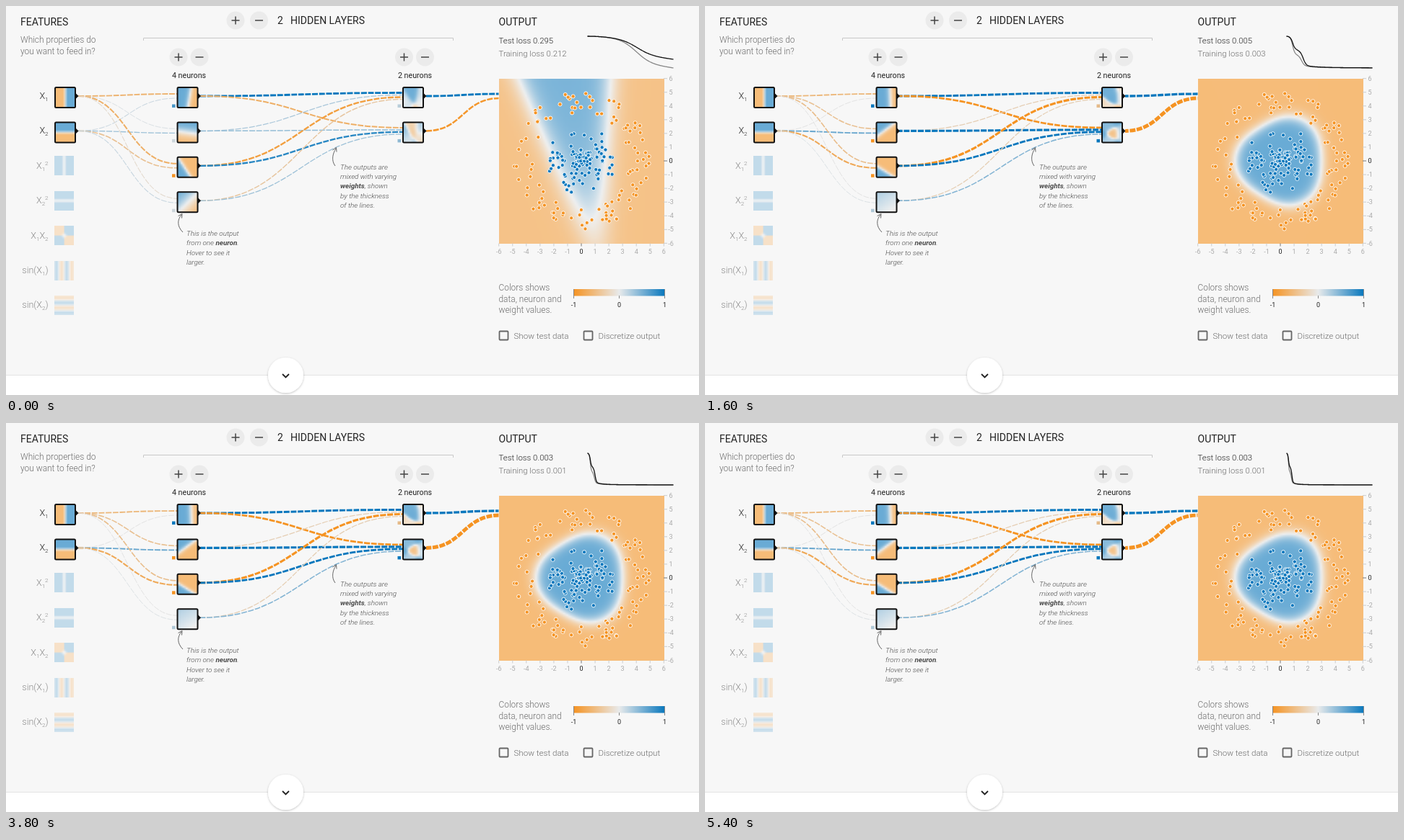
These frames come from a looping animation (960x540 px, 6.11 s). An HTML page with a canvas:

```html
<!DOCTYPE html>
<html lang="en">
<head>
<meta charset="utf-8">
<title>Neural network training</title>
<style>
html, body { margin: 0; width: 100%; height: 100%; overflow: hidden; background: #f7f7f7; }
canvas, svg { position: absolute; left: 0; top: 0; width: 960px; height: 540px; }
text { font-family: Roboto, "Liberation Sans", sans-serif; fill: #6c6c6c; }
.head { font-size: 14px; fill: #222; }
.body { font-size: 11.9px; font-weight: 300; }
.loss { font-size: 11.4px; font-weight: 300; }
.count { font-size: 10.7px; fill: #222; text-anchor: middle; }
.note { font-size: 9.85px; font-weight: 300; font-style: italic; fill: #4c4c4c; }
.note tspan { font-weight: 700; }
.option { font-size: 11.6px; font-weight: 300; }
.axis { font-size: 9px; fill: #aaa; text-anchor: middle; }
.dark { fill: #222; }
.label { font-size: 12.5px; font-weight: 300; fill: #222; text-anchor: end; }
.small { font-size: 8px; }
.off { opacity: .5; }
.stroke { fill: none; stroke: #666; }
</style>
</head>
<body>
<canvas id="stage" width="960" height="540"></canvas>
<svg id="page" viewBox="0 0 960 540">
  <defs>
    <linearGradient id="scale">
      <stop offset="0" stop-color="#f59322"/>
      <stop offset=".5" stop-color="#e8eaeb"/>
      <stop offset="1" stop-color="#0877bd"/>
    </linearGradient>
    <filter id="shadow" x="-30%" y="-30%" width="160%" height="160%">
      <feDropShadow dx="0" dy="1" stdDeviation="1.5" flood-opacity=".25"/>
    </filter>
  </defs>

  <text class="head" x="20" y="27">FEATURES</text>
  <text class="body" x="20" y="51">Which properties do</text>
  <text class="body" x="20" y="66.5">you want to feed in?</text>

  <text class="head" x="376" y="25">2</text>
  <text class="head" x="394" y="25">HIDDEN LAYERS</text>
  <path d="M190.5 48V44.5H619.5V48" fill="none" stroke="#c8c8c8"/>
  <text class="count" x="253.5" y="100">4 neurons</text>
  <text class="count" x="566.5" y="100">2 neurons</text>
  <g id="buttons"></g>
  <g id="labels"></g>

  <text class="head" x="682.5" y="27">OUTPUT</text>
  <text class="loss dark" x="682.5" y="52" id="test"></text>
  <text class="loss" x="682.5" y="70" id="train"></text>
  <g id="axes"></g>

  <path class="stroke" d="M456 222C450 214 453 204 457 198M452.5 200L457.5 196.5L458 202.5"/>
  <g id="noteA"></g>
  <path class="stroke" d="M245 314C237 306 237 297 243 290M238.5 291.5L244 288.5L243.5 294.5"/>
  <g id="noteB"></g>

  <text class="body" x="682.5" y="394.5">Colors shows</text>
  <text class="body" x="682.5" y="410.5">data, neuron and</text>
  <text class="body" x="682.5" y="426">weight values.</text>
  <rect x="786" y="393" width="127" height="9.5" fill="url(#scale)"/>
  <path d="M786.5 393V406M849.5 402V406M912.5 393V406" stroke="#888"/>
  <g id="legend"></g>
  <g id="options"></g>

  <rect y="513" width="960" height="27" fill="#fff"/>
  <path d="M0 512.5H960" stroke="#e4e4e4"/>
  <circle cx="387.5" cy="512.5" r="24.5" fill="#fff" filter="url(#shadow)"/>
  <path d="M383 511L387.5 515.5L392 511" fill="none" stroke="#222" stroke-width="1.8"/>
</svg>
<script>
const LOOP = 6110, STEP = 100, LAST = 54;
const BG = '#f7f7f7', ORANGE = [245, 147, 34], BLUE = [8, 119, 189];
const UNIT = 19.05, CX = 797, CY = 215;
const $ = id => document.getElementById(id);
const ctx = $('stage').getContext('2d');
const lerp = (a, b, p) => a + (b - a) * p;
const rgb = c => `rgb(${c})`;
const add = (id, html) => $(id).insertAdjacentHTML('beforeend', html);
const text = (id, cls, x, y, s) => add(id, `<text class="${cls}" x="${x}" y="${y}">${s}</text>`);

function shade(v, mid = [232, 234, 235]) {
  const end = v < 0 ? ORANGE : BLUE, p = Math.min(1, Math.abs(v));
  return mid.map((m, i) => Math.round(lerp(m, end[i], p)));
}

// Static page parts
function button(x, y, plus) {
  add('buttons', `<circle cx="${x}" cy="${y}" r="12.5" fill="#ebebeb"/>
    <path d="M${x - 5.5} ${y}h11${plus ? `M${x} ${y - 5.5}v11` : ''}" stroke="#444" stroke-width="1.5"/>`);
}
for (const [x, y, gap] of [[318, 20, 32.5], [239, 71, 29], [551.5, 71, 29]]) {
  button(x, y, true);
  button(x + gap, y, false);
}

const sub = s => `<tspan class="small" dy="3">${s}</tspan>`;
const after = s => `<tspan dy="-3">${s}</tspan>`;
const sup = s => `<tspan class="small" dy="-8">${s}</tspan>`;
[
  'X' + sub(1), 'X' + sub(2),
  'X' + sub(1) + sup(2), 'X' + sub(2) + sup(2),
  'X' + sub(1) + after('X') + sub(2),
  'sin(X' + sub(1) + after(')'), 'sin(X' + sub(2) + after(')')
].forEach((s, i) => text('labels', i < 2 ? 'label' : 'label off', 58.5, 129 + 48.4 * i, s));

for (let i = -6; i <= 6; i++) {
  const x = CX + i * UNIT, y = CY - i * UNIT, cls = i ? 'axis' : 'axis dark';
  text('axes', cls, x, 344, i);
  text('axes', cls, 921, y + 3.2, i);
  add('axes', `<path d="M${x} 329.5v4M911 ${y}h5" stroke="${i ? '#ccc' : '#777'}"/>`);
}
for (const v of [-1, 0, 1]) text('legend', 'axis dark', 849.5 + 63 * v, 418, v);

['Show test data', 'Discretize output'].forEach((s, i) => {
  const x = 683.5 + 117 * i;
  add('options', `<rect class="stroke" x="${x}" y="451.5" width="12" height="12" rx="1" stroke-width="1.8"/>`);
  text('options', 'option', x + 20, 461.5, s);
});

['The outputs are', 'mixed with varying', '<tspan>weights</tspan>, shown',
  'by the thickness', 'of the lines.'
].forEach((s, i) => text('noteA', 'note', 463, 226.8 + 13.3 * i, s));
['This is the output', 'from one <tspan>neuron</tspan>.', 'Hover to see it', 'larger.'
].forEach((s, i) => text('noteB', 'note', 250, 319 + 13.3 * i, s));

// Neurons: weights then bias, untrained and trained
const HIDDEN = [
  { from: [-.6, .1, .7], to: [-.55, -.02, 1.2] },
  { from: [.04, .3, .05], to: [-.42, .56, -1.1] },
  { from: [-.65, -.42, -1.2], to: [-.45, -.72, -2.1] },
  { from: [-.12, .12, .05], to: [-.02, .03, .2] }
];
const SECOND = [
  { from: [1.1, .25, -.85, -.35, .15], to: [1.2, -.25, -1.3, -.25, -.45] },
  { from: [-.65, .35, .85, .3, .35], to: [-1.05, 1.3, 1.1, .42, 1.7] }
];
const OUTPUT = { from: [1.15, -.95], to: [1.4, -2.35] };

const trained = n => 1 - Math.exp(-n / 3);
const weights = (cell, p) => cell.from.map((v, i) => lerp(v, cell.to[i], p));

// Output: an open wedge that closes into a rounded triangle
function wedge(x, y) {
  const left = .918 * x + .396 * y + 1.82, right = 1.8 + .058 * y - x, k = .85;
  return .87 * Math.tanh(-1.1 * Math.log(Math.exp(-k * left) + Math.exp(-k * right)) / k);
}
function blob(x, y) {
  const a = Math.atan2(y, x), edge = 3.13 - .23 * Math.cos(3 * a) + .08 * Math.cos(a);
  return Math.tanh(6 * (1 - Math.hypot(x, y) / edge));
}

// Heat maps
function buffer(size) {
  const c = document.createElement('canvas');
  c.width = c.height = size;
  return c;
}
const small = buffer(12), large = buffer(100);
function heat(fn, buf, x, y, size) {
  const n = buf.width, g = buf.getContext('2d'), img = g.createImageData(n, n);
  for (let j = 0, p = 0; j < n; j++) {
    for (let i = 0; i < n; i++, p += 4) {
      const v = fn(((i + .5) / n - .5) * 12, (.5 - (j + .5) / n) * 12);
      img.data.set([...shade(v), 152], p);
    }
  }
  g.putImageData(img, 0, 0);
  ctx.fillStyle = BG;
  ctx.fillRect(x, y, size, size);
  ctx.drawImage(buf, x, y, size, size);
}

const rowY = i => 125 + 48.4 * i;
function node(fn, x, i, bias) {
  const y = rowY(i) - 13;
  heat(fn, small, x + 1, y + 1, 28);
  ctx.strokeStyle = ctx.fillStyle = '#111';
  ctx.lineWidth = 2;
  ctx.beginPath();
  ctx.roundRect(x + 1, y + 1, 28, 28, 1.5);
  ctx.stroke();
  ctx.beginPath();
  ctx.moveTo(x + 29, y + 8.5);
  ctx.lineTo(x + 33.5, y + 13);
  ctx.lineTo(x + 29, y + 17.5);
  ctx.fill();
  if (bias === undefined) return;
  ctx.fillStyle = rgb(shade(bias, [216, 220, 222]));
  ctx.fillRect(x - 6.5, y + 24.5, 4.5, 4.5);
}
function link(w, x0, i, x1, j, slot, count, n) {
  const y0 = rowY(i), y1 = rowY(j) + (slot - (count - 1) / 2) / count * 12, mid = (x0 + x1) / 2;
  ctx.strokeStyle = rgb(shade(w, [224, 226, 228]));
  ctx.lineWidth = .85 + Math.abs(w) * 1.75;
  ctx.setLineDash([8, 1.7]);
  ctx.lineDashOffset = -n;
  ctx.beginPath();
  ctx.moveTo(x0, y0);
  ctx.bezierCurveTo(mid, y0, mid, y1, x1, y1);
  ctx.stroke();
  ctx.setLineDash([]);
}

const UNUSED = [(x, y) => x * x, (x, y) => y * y, (x, y) => x * y, x => Math.sin(x), (x, y) => Math.sin(y)];

// Data points: a core and a ring around it
let seed = 41;
function random() {
  seed = (seed * 16807) % 2147483647;
  return seed / 2147483647;
}
function scatter(total, r0, r1) {
  return Array.from({ length: total }, () => {
    const a = random() * 2 * Math.PI, r = lerp(r0, r1, random()) * UNIT;
    return [CX + r * Math.cos(a), CY + r * Math.sin(a)];
  });
}
const ring = scatter(115, 3.5, 5), core = scatter(115, 0, 2.5);
function drawDots(dots, color) {
  ctx.fillStyle = rgb(color);
  ctx.strokeStyle = '#fff';
  ctx.lineWidth = .9;
  for (const [x, y] of dots) {
    ctx.beginPath();
    ctx.arc(x, y, 2.6, 0, 7);
    ctx.fill();
    ctx.stroke();
  }
}

// Loss falls in two steps, then fades towards a floor
const drop = (e, mid, width) => 1 / (1 + Math.exp((e - mid) / width));
const decay = (e, floor, tail) => floor + tail / (1 + e * e);
const testLoss = e => decay(e, .0025, .16) + .141 * drop(e, .58, .09) + .2143 * drop(e, 1.55, .13);
const trainLoss = e => decay(e, .0005, .1325) + .2356 * drop(e, .57, .09) + .1494 * drop(e, 1.4, .13);

function lossLine(fn, age, color) {
  const low = trainLoss(age), high = testLoss(0);
  ctx.strokeStyle = color;
  ctx.lineWidth = 1.3;
  ctx.beginPath();
  for (let x = 0; x <= 119; x += .5) {
    ctx.lineTo(805.5 + x, 86 - 44 * (fn(age * x / 119) - low) / (high - low));
  }
  ctx.stroke();
}

function draw(n) {
  const p = trained(n), age = 1 + n * .433;
  const hw = HIDDEN.map(c => weights(c, p)), sw = SECOND.map(c => weights(c, p));
  const hidden = hw.map(([a, b, c]) => (x, y) => Math.tanh(a * x + b * y + c));
  const second = sw.map(w => (x, y) =>
    Math.tanh(hidden.reduce((sum, h, i) => sum + w[i] * h(x, y), w[4])));
  ctx.clearRect(0, 0, 960, 540);

  hw.forEach((w, h) => {
    for (let f = 0; f < 2; f++) link(w[f], 100, f, 237, h, f, 2, n);
    for (let s = 0; s < 2; s++) link(sw[s][h], 269, h, 550, s, h, 4, n);
  });
  weights(OUTPUT, p).forEach((w, s) => link(w, 582, s, 684, 0, s, 2, n));

  node(x => x, 67, 0);
  node((x, y) => y, 67, 1);
  ctx.globalAlpha = .37;
  UNUSED.forEach((fn, i) => heat(fn, small, 67, 208.3 + 48.4 * i, 27));
  ctx.globalAlpha = 1;
  hidden.forEach((fn, i) => node(fn, 236.5, i, hw[i][2]));
  second.forEach((fn, i) => node(fn, 549, i, sw[i][4]));

  heat((x, y) => lerp(wedge(x, y), blob(x, y), p), large, 682.5, 100.5, 229);
  drawDots(ring, ORANGE);
  drawDots(core, BLUE);

  lossLine(trainLoss, age, '#888');
  lossLine(testLoss, age, '#111');
  $('test').textContent = 'Test loss ' + testLoss(age).toFixed(3);
  $('train').textContent = 'Training loss ' + trainLoss(age).toFixed(3);
}

const start = performance.now();
let shown = -1;
function tick() {
  const t = (performance.now() - start) % LOOP;
  const n = Math.min(LAST, Math.floor(t / STEP));
  if (n !== shown) draw(shown = n);
  requestAnimationFrame(tick);
}
tick();
</script>
</body>
</html>
```
